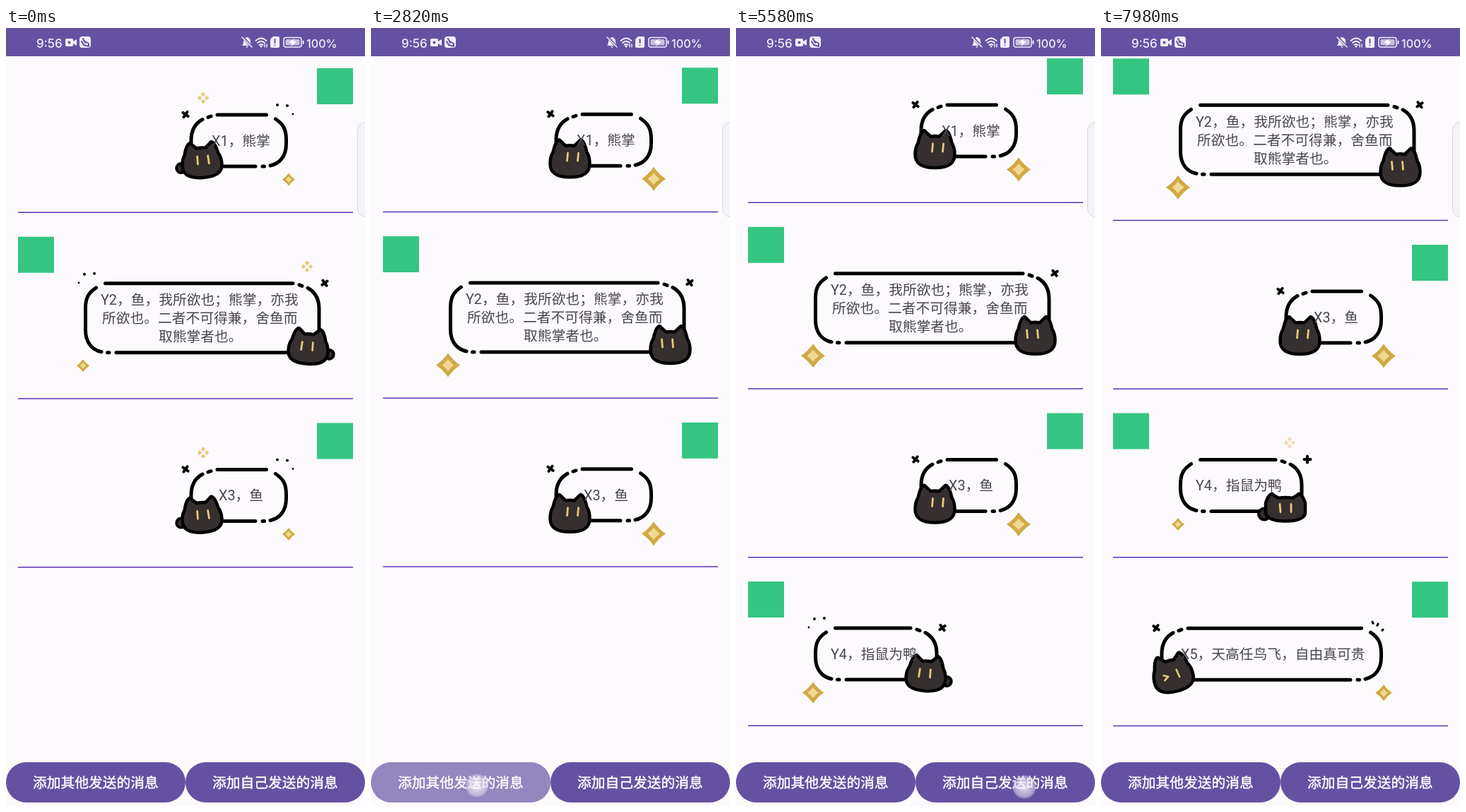
An HTML page with a canvas for the animation above (8000 ms loop, 508 by 1102 pixels).

```html
<!DOCTYPE html>
<html lang="zh-CN">
<head>
<meta charset="utf-8">
<style>
html, body { margin: 0; width: 100%; height: 100%; overflow: hidden; background: #fdfafe; }
canvas { display: block; }
</style>
</head>
<body>
<canvas id="stage" width="508" height="1102"></canvas>
<script>
const ctx = document.getElementById('stage').getContext('2d');
const LOOP = 8000, FRAME = 280, LAST = 25;
const PAPER = '#fdfafe', PURPLE = '#6551a2', INK = '#000', FUR = '#35302f', GOLD = '#e8c878';
const FONT = '19.75px Roboto, "Noto Sans CJK SC", sans-serif';

// Sticker poses, one letter per step: A sit + tail, B sit, C crouch, D wink, E wink + tail
const POSES = 'BBDEEDEDDBAACCDDEAACCBABAB';
const CLICKS = [
  { at: 2715, left: 0, x: 150, y: 1073, shift: 14, label: '添加其他发送的消息' },
  { at: 5760, left: 254, x: 408, y: 1075, shift: 238.5, label: '添加自己发送的消息' }
];
const ITEMS = [
  { top: 57, dir: -1, edge: 397, w: 135, h: 73, lines: [[291, 'X1，熊掌']], start: -5160 },
  { top: 295.8, dir: 1, edge: 112, w: 331, h: 98, start: -5160,
    lines: [[134, 'Y2，鱼，我所欲也；熊掌，亦我'], [136, '所欲也。二者不可得兼，舍鱼而'], [216, '取熊掌者也。']] },
  { top: 559.5, dir: -1, edge: 397, w: 135, h: 73, lines: [[301, 'X3，鱼']], start: -5070 },
  { top: 798, dir: 1, edge: 112, w: 172, h: 73, lines: [[134, 'Y4，指鼠为鸭']], start: 2650, fade: 3455 },
  { top: 1036.7, dir: -1, edge: 397, w: 311, h: 73, lines: [[113, 'X5，天高任鸟飞，自由真可贵']], start: 5730, fade: 6500 }
];

const clamp = v => Math.max(0, Math.min(1, v));
const ease = v => (1 - Math.cos(Math.PI * clamp(v))) / 2;

function stroke(color, width, path) {
  ctx.strokeStyle = color;
  ctx.lineWidth = width;
  ctx.lineCap = ctx.lineJoin = 'round';
  ctx.stroke(new Path2D(path));
}
function fill(color, path) {
  ctx.fillStyle = color;
  ctx.fill(new Path2D(path));
}
function box(color, x, y, w, h, r = 0) {
  ctx.fillStyle = color;
  ctx.beginPath();
  ctx.roundRect(x, y, w, h, r);
  ctx.fill();
}
function disc(color, x, y, r) {
  ctx.fillStyle = color;
  ctx.beginPath();
  ctx.arc(x, y, r, 0, 7);
  ctx.fill();
}
// A thin outline gives medium weight where the font has none
function label(text, x, y, color, font = FONT, outline = 0) {
  ctx.font = font;
  ctx.fillStyle = ctx.strokeStyle = color;
  ctx.fillText(text, x, y);
  if (!outline) return;
  ctx.lineWidth = outline;
  ctx.strokeText(text, x, y);
}
function at(x, y, angle, draw) {
  ctx.save();
  ctx.translate(x, y);
  ctx.rotate(angle);
  draw();
  ctx.restore();
}

// Four-pointed star; bend 0.5 gives straight sides
function star(color, r, bend) {
  const b = r * bend;
  fill(color, `M0 ${-r}Q${b} ${-b} ${r} 0Q${b} ${b} 0 ${r}Q${-b} ${b} ${-r} 0Q${-b} ${-b} 0 ${-r}Z`);
}

function cat(pose, w, h) {
  const crouch = pose === 'C', wink = pose === 'D' || pose === 'E';
  const [dx, dy] = { A: [15, 9.5], B: [19.5, 11], C: [23, 6], D: [15, 10], E: [13, 9.5] }[pose];
  const ear = crouch ? 20 : 16;
  const b = { A: 25.5, C: 20, E: 24.5 }[pose] || 27;
  at(w - dx, h - dy, wink ? 0.24 : pose === 'A' ? 0.07 : 0, () => {
    if (pose !== 'B' && pose !== 'D') {
      const tx = crouch ? -30 : 30;
      disc(INK, tx, 10, crouch ? 10 : 8.5);
      disc(FUR, tx, 10, crouch ? 6 : 4.5);
    }
    const side = ear + 8, base = -b * 0.3, dip = -b * 0.64, tip = 2 - b;
    const body = `M-28 8Q-28 ${base + 6} ${-side} ${base}Q${-ear - 5} ${tip + 3} ${-ear - 1} ${tip}
      Q${-ear + 1} ${-b} ${-ear + 3} ${tip + 1}L${-ear + 10} ${dip}Q0 ${dip - 1.5} ${ear - 10} ${dip}
      L${ear - 3} ${tip + 1}Q${ear - 1} ${-b} ${ear + 1} ${tip}Q${ear + 5} ${tip + 3} ${side} ${base}
      Q28 ${base + 6} 28 8C28 ${b - 5} 18 ${b} 0 ${b}C-18 ${b} -28 ${b - 5} -28 8Z`;
    fill(FUR, body);
    stroke(INK, 4.5, body);
    if (wink) stroke(GOLD, 2.6, 'M-6.5 -3L-8.500 8M13 1L7 4L13 8');
    else if (crouch) stroke(GOLD, 2.8, 'M-8 -4L-7 7M8 -4L8 7');
    else stroke(GOLD, 2.8, pose === 'A' ? 'M-9 -5L-10 6M6 -5L6 6' : 'M-12 -7L-11 4M3 -7L4 4');
  });
}

// Drawn with the cat on the right; mirrored by the caller for the other side
function bubble(step, w, h) {
  const pose = POSES[step], phase = step % 13;
  stroke(INK, 5, `M28.500 0H${w - 37}M${w - 28} 2L${w - 24} 3.500M${w - 16} 6.500C${w - 6} 12 ${w} 22 ${w} 36V${h - 20}
    M15.500 6C5 13 0.500 20 0.500 35V${h - 32}C0.500 ${h - 14} 10 ${h - 4} 23 ${h - 1}M31.500 ${h}H34M44 ${h}H${w - 30}`);

  const upright = pose === 'C' || pose === 'E';
  at(w + 8, -0.5, upright ? 0 : 0.95, () => stroke(INK, 4, 'M-4.5 0H4.5M0 -4.5V4.5'));

  const r = 13 + 4 * Math.cos(2 * Math.PI * (step - 12) / 13);
  at(-3, h + 18.5, 0, () => {
    star('#d1a944', r, 0.4);
    star('#f0d994', r * 0.5, 0.42);
  });

  if (phase >= 3 && phase <= 6) {
    ctx.globalAlpha = phase === 6 ? 0.55 : 0.9;
    const d = phase === 3 ? 4 : 5;
    for (let i = 0; i < 4; i++) at(w - 17, -24, i * Math.PI / 2, () => {
      ctx.translate(0, -d);
      star('#e5c677', 3.4, 0.5);
    });
    ctx.globalAlpha = 1;
  }
  if (pose === 'A') {
    disc(INK, 13, -14, 2);
    disc(INK, -1, -13, 2);
    disc(INK, -9, -1, 1.4);
  }
  if (pose === 'D') stroke(INK, 3.2, 'M13 -9L12 -7M5 -6L6 -4M-2 2L-1 3');
  if (pose === 'E') stroke(INK, 3.2, 'M16 -13L14 -9M3 -7L6 -3M-7 2L-3 4');
  cat(pose, w, h);
}

function item(it, t, scroll) {
  const alpha = it.fade ? ease((t - it.fade) / 340) : 1;
  const y = it.top - scroll, end = y + 131 + it.h;
  if (!alpha || end < 20) return;
  const step = Math.max(0, Math.min(LAST, Math.floor((t - it.start) / FRAME)));
  box('#35c583', it.dir > 0 ? 17 : 440, y, 51, 51);
  ctx.save();
  ctx.translate(it.edge, y + 66);
  ctx.scale(it.dir, 1);
  bubble(step, it.w, it.h);
  ctx.restore();
  it.lines.forEach(([x, text], i) =>
    label(text, x, y + 73.3 + it.h / 2 + (i - (it.lines.length - 1) / 2) * 26, '#49454f'));
  if (alpha < 1) {
    ctx.globalAlpha = 1 - alpha;
    box(PAPER, 0, y - 2, 508, end - y);
    ctx.globalAlpha = 1;
  }
  box('#5a34b0', 17, end - 0.5, 474, 1.5);
}

function button(c, t) {
  const u = t - c.at;
  ctx.save();
  box(PURPLE, c.left, 1040, 254, 57, 28.5);
  ctx.clip();
  const glow = 0.3 * clamp((u + 160) / 210) * clamp((600 - u) / 180);
  disc(`rgba(255,255,255,${glow})`, c.x, c.y, 20 + 260 * clamp((u + 160) / 520));
  ctx.restore();
  label(c.label, c.left + 38, 1076, '#fff', FONT, 0.45);
}

function touch(c, t) {
  const u = t - c.at, a = 0.75 * clamp((u + 300) / 60) * clamp((540 - u) / 300);
  if (!a) return;
  const g = ctx.createRadialGradient(c.x, c.y, 2, c.x, c.y, 17);
  g.addColorStop(0, `rgba(255,255,255,${a})`);
  g.addColorStop(0.75, `rgba(225,220,238,${a * 0.8})`);
  g.addColorStop(1, `rgba(190,180,215,${a * 0.5})`);
  disc(g, c.x, c.y, 16.5);
}

function statusBar() {
  const white = '#f3effa';
  box(PURPLE, 0, 0, 508, 40);
  label('9:56', 43, 27.5, white, '500 17px Inter, sans-serif');
  label('100%', 425, 27.5, white, '500 16.2px Inter, sans-serif');
  // video camera
  box(white, 84, 15, 11, 11, 2);
  fill(white, 'M95 19L100 16V25L95 22Z');
  disc(PURPLE, 89.5, 20.5, 2);
  // touch recorder
  box(white, 104, 12, 16, 16, 4);
  stroke(PURPLE, 2, 'M109 15L112 21M107 19L110 24L117 26V22L112 19');
  // muted bell
  fill(white, 'M334 25Q336 23 336 19Q336 14 341 13Q346 14 346 19Q346 23 348 25ZM339 26H343L341 28Z');
  stroke(PURPLE, 3.5, 'M335 13L348 27');
  stroke(white, 1.5, 'M334 13L348 27');
  // wifi
  stroke(white, 1.8, 'M353.5 18Q361 11 368.5 18M356 21Q361 16.5 366 21M358.5 24Q361 22 363.5 24');
  disc(white, 361, 26, 1.5);
  stroke(white, 1.4, 'M366 27V23M369 23V27');
  // card alert
  fill(white, 'M374 16L378 12H385Q387 12 387 14V26Q387 28 385 28H376Q374 28 374 26Z');
  stroke(PURPLE, 2, 'M380.5 16V21M380.5 24.5V24.6');
  // battery
  ctx.strokeStyle = white;
  ctx.lineWidth = 1.5;
  ctx.beginPath();
  ctx.roundRect(393, 13.5, 25, 13.5, 3);
  ctx.stroke();
  box('#c9bfe2', 395.5, 16, 20, 8.5, 1.5);
  fill('#fff', 'M408 15L400 21H405L403 26L411 19H406Z');
  stroke(white, 2, 'M420.5 18.5V22');
}

function render(now) {
  const t = now % LOOP;
  box(PAPER, 0, 0, 508, 1102);
  const scroll = CLICKS.reduce((sum, c) => sum + c.shift * ease((t - c.at) / 700), 0);
  ctx.save();
  ctx.beginPath();
  ctx.rect(0, 40, 508, 1000);
  ctx.clip();
  ITEMS.forEach(it => item(it, t, scroll));
  ctx.restore();
  statusBar();
  CLICKS.forEach(c => button(c, t));
  CLICKS.forEach(c => touch(c, t));
  // edge panel handle
  box('#f5f2f8', 497.5, 133.5, 30, 134, 11);
  ctx.strokeStyle = '#d9d6df';
  ctx.lineWidth = 1;
  ctx.stroke();
  requestAnimationFrame(() => render(performance.now()));
}
render(0);
</script>
</body>
</html>
```
